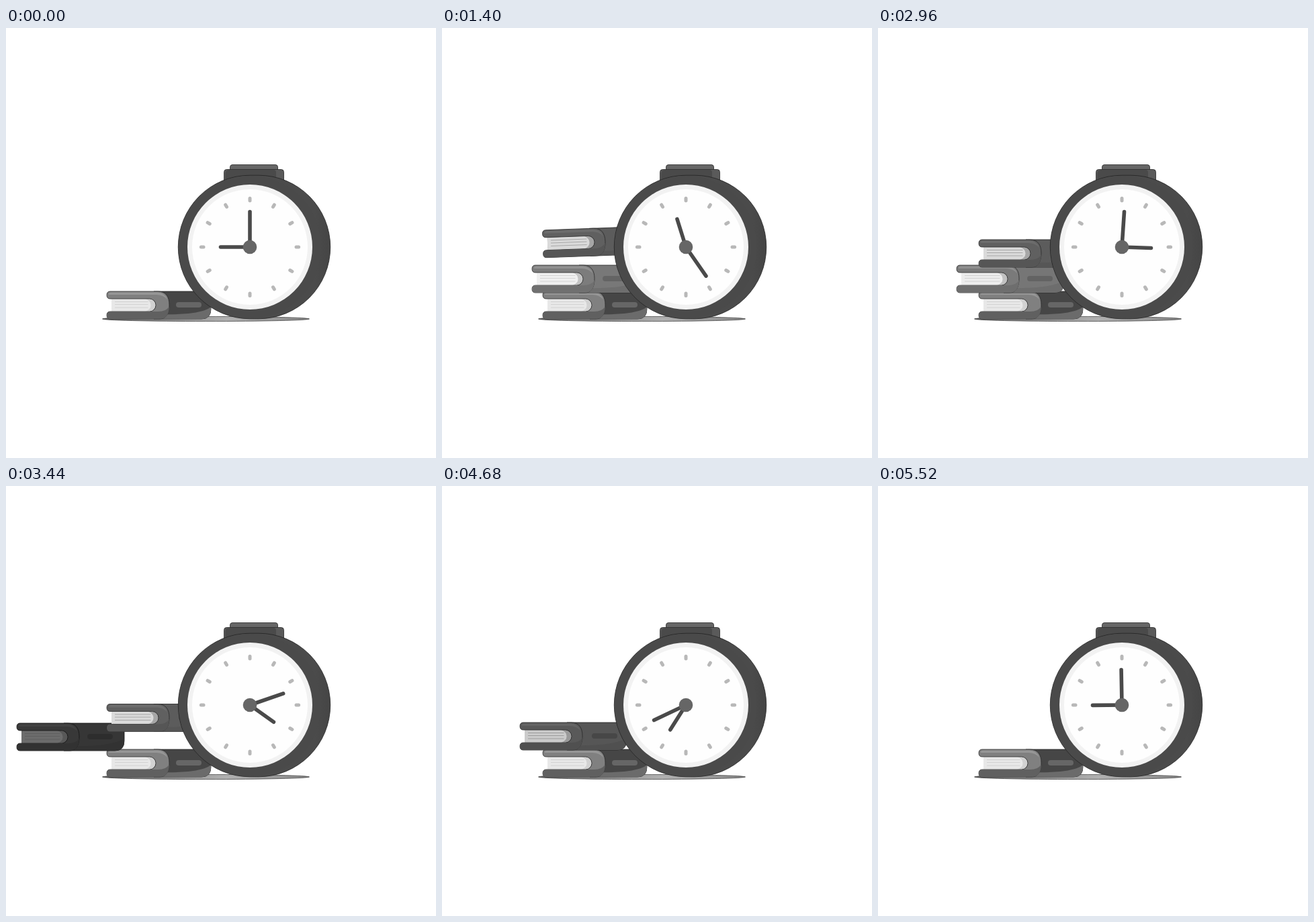
Write an HTML page that moves like this. It is 640 by 640 pixels and loops after 5560 ms.

```html
<!DOCTYPE html>
<html lang="en">
<head>
<meta charset="utf-8">
<title>Clock and books</title>
<style>
  html, body { margin: 0; width: 100%; height: 100%; overflow: hidden; background: #fff; }
  svg { display: block; width: 100vw; height: 100vh; }
</style>
</head>
<body>
<svg id="stage" viewBox="0 0 640 640">
  <defs>
    <linearGradient id="floor">
      <stop offset="0" stop-color="#666"/>
      <stop offset=".6" stop-color="#b0b0b0"/>
      <stop offset="1" stop-color="#8a8a8a"/>
    </linearGradient>
    <linearGradient id="side">
      <stop offset="0" stop-color="#4b4b4b"/>
      <stop offset=".9" stop-color="#4b4b4b"/>
      <stop offset="1" stop-color="#454545"/>
    </linearGradient>
  </defs>
  <ellipse cx="297.5" cy="433" rx="154" ry="3.6" fill="url(#floor)" stroke="#333" stroke-width=".7"/>
  <g id="books"></g>
  <g id="clock">
    <rect x="333.5" y="203.5" width="71" height="14" rx="3.5" fill="#666" stroke="#2a2a2a" stroke-width=".8"/>
    <rect x="324.5" y="210.5" width="89" height="24" rx="4" fill="#5a5a5a" stroke="#2a2a2a" stroke-width=".8"/>
    <path d="M333 211H398Q402 211 402 215V232H326V217Q326 211 333 211Z" fill="#4a4a4a"/>
    <path d="M363 219.2H376A106.8 106.8 0 0 1 376 432.8H363A106.8 106.8 0 0 1 363 219.2Z"
      fill="url(#side)" stroke="#222" stroke-width=".8"/>
    <circle cx="363" cy="326" r="106" fill="#4a4a4a"/>
    <circle cx="363" cy="326" r="93" fill="#f2f2f2"/>
    <circle cx="363" cy="326" r="86" fill="#fefefe"/>
    <g id="ticks" stroke="#b8b8b8" stroke-width="5" stroke-linecap="round"></g>
    <g stroke="#4a4a4a" stroke-width="5.6" stroke-linecap="round">
      <path id="hour" d="M363 326V282.5"/>
      <path id="minute" d="M363 326V273.5"/>
    </g>
    <circle cx="363" cy="326" r="10.3" fill="#666"/>
  </g>
</svg>
<script>
const LOOP = 5560, STEP = 40;
const $ = id => document.getElementById(id);

// Smooth monotone curve through [time, value] pairs, held at both ends.
function curve(keys) {
  const n = keys.length - 1;
  const rise = i => (keys[i + 1][1] - keys[i][1]) / (keys[i + 1][0] - keys[i][0]);
  const slope = i => {
    if (i === 0) return rise(0);
    if (i === n) return rise(n - 1);
    const a = rise(i - 1), b = rise(i);
    return a * b <= 0 ? 0 : 2 * a * b / (a + b);
  };
  return t => {
    if (t <= keys[0][0]) return keys[0][1];
    if (t >= keys[n][0]) return keys[n][1];
    let i = 0;
    while (t >= keys[i + 1][0]) i++;
    const [t0, v0] = keys[i], [t1, v1] = keys[i + 1];
    const d = t1 - t0, u = (t - t0) / d, w = 1 - u;
    return v0 * w * w * (1 + 2 * u) + v1 * u * u * (3 - 2 * u)
      + d * u * w * (slope(i) * w - slope(i + 1) * u);
  };
}

const turn = curve([[160, 0], [760, 29.7], [1400, 72.6], [2240, 131.5],
  [3440, 215.5], [4680, 302.3], [5520, 359.5], [5560, 360]]);
const fadeIn = curve([[160, 0], [640, 1]]);
const leave = curve([[2840, 0], [2960, -17], [3040, -34], [3440, -118], [3560, -142]]);
const fadeOut = curve([[2940, 1], [3040, .93], [3440, .45], [3600, 0]]);

function book(look) {
  const { w, page } = look;
  const end = page - 9.5;
  const g = document.createElementNS("http://www.w3.org/2000/svg", "g");
  const body = `M70 0H${w - 10}Q${w} 2 ${w} 12V26Q${w} 41 ${w - 14} 41H70Z`;
  const front = `M5 0H76C88 0 93 8 93 20C93 33 88 41 79 41H5Q0 41 0 35.5Q0 30 5 30H${end}`
    + `A9.5 9.5 0 0 0 ${end} 11H5Q0 11 0 5.5Q0 0 5 0Z`;
  const lines = [15.5, 19.5, 24].map(y => `M12 ${y}H${end - 2}`).join("");
  g.innerHTML = `
    <path d="${body}" fill="${look.spine}" stroke="#222" stroke-width=".8"/>
    <path d="M80 34C115 35 145 32 ${w} 23V26Q${w} 41 ${w - 14} 41H80Z" fill="${look.under}"/>
    <rect x="${look.tag}" y="16" width="38" height="8" rx="4" fill="${look.label}"/>
    <path d="M7 11H${end}A9.5 9.5 0 0 1 ${end} 30H7Z" fill="${look.shade}"/>
    <path d="M7 11H${end - 6}Q${end + 2} 14 ${end + 2} 20.5Q${end + 2} 27 ${end - 6} 30H7Z" fill="${look.paper}"/>
    <path d="${lines}" stroke="${look.line}" stroke-width="1"/>
    <path d="${front}" fill="${look.cover}" stroke="#2a2a2a" stroke-width=".8"/>
    <path d="M5 30H76Q89 30 93 22C93 34 88 41 79 41H5Q0 41 0 35.5Q0 30 5 30Z" fill="${look.low}"/>
    <path d="M3 3Q4 1.5 6 1.5H75Q87 2 90 12Q84 5 74 5H3Z" fill="${look.shine}"/>`;
  $("books").append(g);
  return g;
}

const base = book({ w: 155, page: 73, tag: 103, spine: "#464646", under: "#6b6b6b", label: "#666",
  cover: "#808080", low: "#606060", shine: "#969696", paper: "#e8e8e8", shade: "#d2d2d2", line: "#d2d2d2" });
base.setAttribute("transform", "translate(150 392)");

const movers = [
  { x: 134, y: 353, delay: 0, tilt: -.21,
    drop: curve([[160, -65], [760, -28], [1200, 0]]),
    el: book({ w: 160, page: 76, tag: 105, spine: "#787878", under: "#6e6e6e", label: "#646464",
      cover: "#7c7c7c", low: "#707070", shine: "#919191", paper: "#f0f0f0", shade: "#c4c4c4", line: "#d4d4d4" }) },
  { x: 150, y: 315, delay: 1640, tilt: .122,
    drop: curve([[160, -94], [760, -57], [1400, -17], [1760, 0], [3080, 0], [3440, 9.5], [3900, 37]]),
    el: book({ w: 159, page: 77, tag: 107, spine: "#5c5c5c", under: "#565656", label: "#4c4c4c",
      cover: "#606060", low: "#565656", shine: "#6c6c6c", paper: "#dadada", shade: "#a6a6a6", line: "#a8a8a8" }) }
];

$("ticks").innerHTML = Array.from({ length: 12 }, (_, i) =>
  `<path d="M363 257V253.4" transform="rotate(${i * 30} 363 326)"/>`).join("");

function draw(t) {
  const a = turn(t);
  $("hour").setAttribute("transform", `rotate(${270 + a} 363 326)`);
  $("minute").setAttribute("transform", `rotate(${2 * a} 363 326)`);
  for (const m of movers) {
    const out = t - m.delay;
    const light = fadeIn(t) * fadeOut(out);
    const dy = m.drop(t), angle = Math.min(dy, 0) * m.tilt;
    const shown = t >= 200 && out < 3560;
    m.el.style.visibility = shown ? "visible" : "hidden";
    m.el.style.filter = light < 1 ? `brightness(${light})` : "none";
    m.el.setAttribute("transform",
      `translate(${m.x + leave(out)} ${m.y + dy}) rotate(${angle} 80 20.5)`);
  }
}

const start = performance.now();
function tick() {
  const t = (performance.now() - start) % LOOP;
  draw(Math.floor(t / STEP) * STEP);
  requestAnimationFrame(tick);
}
tick();
</script>
</body>
</html>
```
